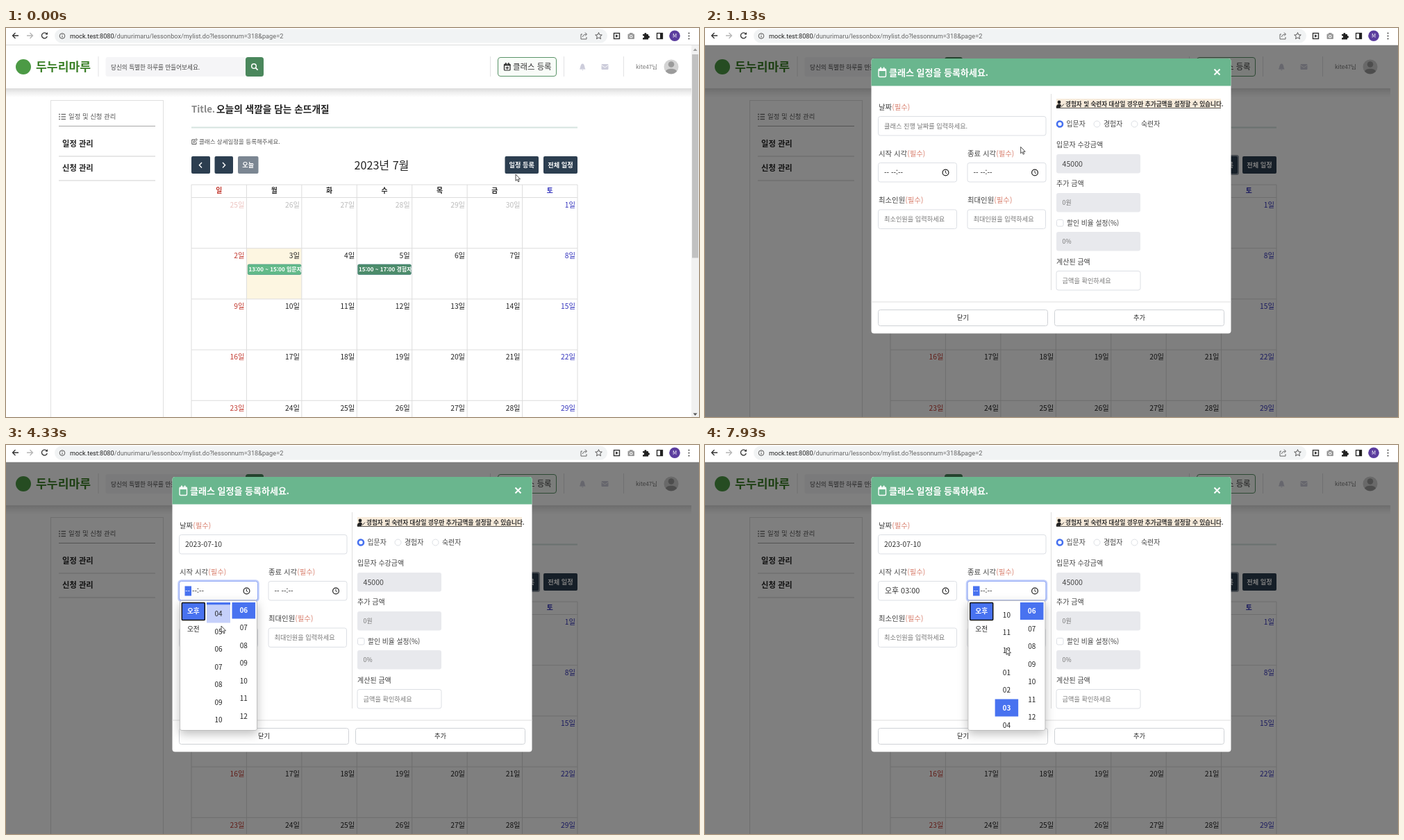
Recreate the animation shown at these times as an HTML page. Size 998x561 px, loop 8000 ms.

```html
<!DOCTYPE html>
<html lang="ko">
<head>
<meta charset="utf-8">
<title>일정 등록</title>
<style>
html, body { margin: 0; width: 100%; height: 100%; overflow: hidden; background: #fff; }
#stage { display: block; width: 100%; height: 100%; font-family: "Noto Sans CJK KR", "Noto Sans CJK JP", "Noto Sans", sans-serif; }
text { white-space: pre; }
.url { font-family: Roboto, "Open Sans", sans-serif; }
.float { filter: drop-shadow(0 5px 7px rgba(0, 0, 0, .25)); }
</style>
</head>
<body>
<svg id="stage" viewBox="0 0 998 561"></svg>
<script>
const LOOP = 8000, STEP = 200 / 3, PITCH = 25.5;
const BLUE = '#4872f0', INK = '#222', RED = '#c2392f', SAT = '#3434bd';
const BOLD = 'font-weight="700"', MID = 'text-anchor="middle"', END = 'text-anchor="end"';
const URL_HOST = 'mock.test:8080', URL_PATH = '/dunurimaru/lessonbox/mylist.do?lessonnum=318&amp;page=2';

// Text is placed by its vertical centre.
const T = (x, y, s, size, fill = INK, more = '') =>
  `<text x="${x}" y="${y + size * .37}" font-size="${size}" fill="${fill}" ${more}>${s}</text>`;
const R = (x, y, w, h, fill, more = '') =>
  `<rect x="${x}" y="${y}" width="${w}" height="${h}" fill="${fill}" ${more}/>`;
const P = (d, stroke, w = 1, fill = 'none', more = '') =>
  `<path d="${d}" stroke="${stroke}" stroke-width="${w}" fill="${fill}" ${more}/>`;
const C = (x, y, r, fill, more = '') => `<circle cx="${x}" cy="${y}" r="${r}" fill="${fill}" ${more}/>`;
const G = (id, body, more = '') => `<g id="${id}" ${more}>${body}</g>`;
const range = (a, b) => Array.from({ length: b - a + 1 }, (_, i) => a + i);
const dayColor = c => c === 0 ? RED : c === 6 ? SAT : INK;
const WEEK = [...'일월화수목금토'];

function browserBar() {
  return R(0, 0, 998, 25, '#fff') + P('M0 24.5H998', '#dcdcdc') +
    R(70, 1.5, 796, 20, '#f1f3f4', 'rx="10"') +
    P('M18 11H10M13.5 7 9.5 11 13.5 15', '#333', 1.3) +
    P('M30 11H38M34.5 7 38.5 11 34.5 15', '#b5b5b5', 1.3) +
    P('M58.6 8.4A4 4 0 1 0 59.3 12', '#333', 1.3) + P('M56.4 9.6H60V6Z', 'none', 0, '#333') +
    C(81, 11.5, 3.8, 'none', 'stroke="#555"') + P('M81 11V13.6M81 9V10', '#555') +
    `<text class="url" x="92" y="15" font-size="9.2" fill="${INK}">${URL_HOST}<tspan fill="#666">${URL_PATH}</tspan></text>` +
    P('M830 9H828V16H836V13M830.5 13Q831 9 836 9M834 6.5 836.5 9 834 11.5', '#666') +
    P('M853.5 6.5 854.9 9.8 858.3 10 855.7 12.3 856.5 15.7 853.5 13.9 850.5 15.7 851.3 12.3 848.7 10 852.1 9.8Z', '#555') +
    R(875.5, 7.5, 8, 8, 'none', 'stroke="#333" stroke-width="1.4"') + P('M878 9.2V13.8L881.8 11.5Z', 'none', 0, '#333') +
    R(895.5, 8.5, 9.5, 7.5, '#999', 'rx="1"') + R(898, 7, 4.5, 2, '#999') + C(900.2, 12.2, 2.2, '#fff') + C(900.2, 12.2, 1.2, '#999') +
    P('M917 9H919.3A1.6 1.6 0 1 1 922.4 9H925V11.3A1.6 1.6 0 1 1 925 14.4V16.5H917V14A1.5 1.5 0 1 0 917 11.2Z', 'none', 0, '#222') +
    R(937.5, 7.5, 8, 8, 'none', 'stroke="#222" stroke-width="1.3"') + R(942, 7.5, 4, 8, '#222') +
    C(963, 11.3, 7.8, '#5b3d9e') + T(963, 11.3, 'M', 7.5, '#fff', MID) +
    [7.5, 11.5, 15.5].map(y => C(983.5, y, 1, '#444')).join('');
}

function siteHeader() {
  const dividers = [133, 697.5, 803.5, 889.5].map(x => P(`M${x} 41V70`, '#e2e2e4')).join('');
  return R(0, 87, 987, 13, 'url(#shade)') + R(0, 25, 987, 62, '#fff') + dividers +
    C(25, 56, 11, '#4c9a45') + T(43, 55.5, '두누리마루', 17.2, '#3a7f27', 'font-weight="900"') +
    R(143.5, 42, 202, 28, '#f5f5f7', 'rx="3"') + T(151, 56.5, '당신의 특별한 하루를 만들어보세요.', 8.6, '#444') +
    R(345, 42, 26, 28, '#4a875c', 'rx="3.5"') + C(357, 55, 3.3, 'none', 'stroke="#fff" stroke-width="1.5"') + P('M359.6 57.6 362.6 60.6', '#fff', 1.6) +
    R(708.5, 42.5, 84, 27, '#f8fcf8', 'rx="3.5" stroke="#5a9468"') +
    R(717.5, 52, 8.5, 9, 'none', 'rx="1" stroke="#222" stroke-width="1.2"') + P('M717 53.5H726.5M719.8 50V53M723.8 50V53', '#222', 1.3) + P('M719.5 57.5H724M721.8 55.3V59.8', '#222') +
    T(730, 56, '클래스 등록', 11.4, '#333') +
    P('M826 59.5C827.5 57.5 827 52 830.3 51.6 833.6 52 833 57.5 834.6 59.5ZM829 60.2H831.7L830.3 61.6Z', 'none', 0, '#cdcddb') +
    R(857.5, 52, 10, 8, '#cdcddb', 'rx="1"') + P('M857.5 53.5 862.5 57 867.5 53.5', '#fff', .9) +
    T(907, 56, 'kite47님', 8.2, '#777') +
    C(958, 56, 10.5, '#d3d3d3') + C(958, 52.5, 4.3, '#9b9b9b') + P('M950 62.6C951 57.5 965 57.5 966 62.6 962 67.5 954 67.5 950 62.6Z', 'none', 0, '#9b9b9b');
}

function sidebar() {
  return R(64.5, 104.5, 162, 470, '#fff', 'stroke="#e0e0e0"') +
    [124.5, 128, 131.5].map(y => C(77, y, .9, '#666') + P(`M79.5 ${y}H86`, '#666', 1.3)).join('') +
    T(90, 128, '일정 및 신청 관리', 9.4, '#555') + P('M76 141.5H215', '#a8a8a8') +
    T(81, 167, '일정 관리', 11.3, INK, BOLD) + P('M76 185H215', '#cfcfcf') +
    T(81, 202, '신청 관리', 11.3, INK, BOLD) + P('M76 220H215', '#cfcfcf');
}

function calendar() {
  const w = 556 / 7, x0 = 267, y0 = 244.5, h = 73.2;
  const dark = (x, w, s) => R(x, 185, w, 25, '#2c3e50', 'rx="2"') + T(x + w / 2, 197.5, s, 9.2, '#fff', BOLD + MID.padStart(21));
  const cells = range(0, 34).map(i => {
    const col = i % 7, row = Math.floor(i / 7), other = i < 6;
    const n = other ? 25 + i : i - 5;
    return T((x0 + (col + 1) * w - 3).toFixed(1), y0 + row * h + 10.5, n + '일', 10.3, dayColor(col), END + (other ? ' opacity=".3"' : ''));
  }).join('');
  const lines = range(0, 7).map(i => P(`M${x0 + i * w} 226V561`, '#ddd')).join('') +
    [226, ...range(0, 4).map(i => y0 + i * h)].map(y => P(`M267 ${y}H823`, '#ddd')).join('');
  const event = (x, fill, edge, s) => R(x, 341, 76.5, 14.5, fill, `rx="1.5" stroke="${edge}" stroke-width=".8"`) + T(x + 1.2, 348.3, s, 8, '#fff', BOLD);
  return T(267, 117, 'Title.', 13.3, '#888', BOLD) + T(303, 117, '오늘의 색깔을 담는 손뜨개질', 13.7, INK, BOLD) +
    P('M267 143.5H823', '#d6e4df', 2) +
    P('M272 161H267.8V167.5H274V164.5M270 165.3 270.5 163.2 274 159.6 275.4 161 271.8 164.7Z', '#555') +
    T(278, 163.5, '클래스 상세일정을 등록해주세요.', 8.5, '#555') +
    R(267, 185, 27, 25, '#2c3e50', 'rx="2"') + P('M282 194 278.4 197.7 282 201.4', '#fff', 1.4) +
    R(300.5, 185, 26.5, 25, '#2c3e50', 'rx="2"') + P('M312 194 315.6 197.7 312 201.4', '#fff', 1.4) +
    R(334, 185, 29.5, 25, '#7b8692', 'rx="2"') + T(348.7, 197.5, '오늘', 9.2, '#fff', BOLD + ' ' + MID) +
    T(541, 198, '2023년 7월', 16.1, INK, MID) +
    G('ring', R(716.5, 183, 52.5, 29, '#8d97a2', 'rx="3.5"')) +
    R(718.5, 185, 48.5, 25, '#2c3e50', 'id="addBtn" rx="2"') + T(742.8, 197.5, '일정 등록', 9.2, '#fff', BOLD + ' ' + MID) +
    dark(774, 49, '전체 일정') +
    R(x0 + w, y0 + h, w, h, '#fdf6e1') + lines +
    WEEK.map((d, i) => T(x0 + (i + .5) * w, 234.5, d, 9.8, dayColor(i), BOLD + ' ' + MID)).join('') +
    cells +
    event(348.3, '#62ba89', '#4a9a86', '13:00 ~ 15:00 입문자') + event(506.8, '#4c8c6b', '#3f7c74', '15:00 ~ 17:00 경험자');
}

function scrollbar() {
  return R(987, 25, 11, 536, '#f1f1f1') + R(988, 38, 9, 293.5, '#c1c1c1') +
    P('M989.5 33 992.5 29.5 995.5 33Z', 'none', 0, '#9a9a9a') + P('M989.5 555.5 992.5 559 995.5 555.5Z', 'none', 0, '#555');
}

const box = (x, y, w, fill = '#fff', edge = '#dcdfe4') => R(x, y, w, 27.5, fill, `rx="3" stroke="${edge}"`);
const focusBox = (x, y, w) => R(x - 1, y - 1, w + 2, 29.5, 'none', 'rx="4" stroke="#c3d0fb" stroke-width="2.6"') + R(x, y, w, 27.5, 'none', 'rx="3" stroke="#93aaf6"');
const label = (x, y, s) => T(x, y, `${s}<tspan fill="#d9806f">(필수)</tspan>`, 10.4, '#444');

function timeField(id, x) {
  const c = x + 97;
  return box(x, 196.5, 113) + G(id + 'Focus', focusBox(x, 196.5, 113)) +
    G(id + 'Mark', R(x + 8, 203.5, 9.5, 14, BLUE)) +
    G(id + 'Blank', T(x + 8.5, 210.3, `<tspan id="${id}Dash">--</tspan> --:--`, 10.2, INK)) +
    G(id + 'Value', T(x + 9.5, 210.3, '오후 03:00', 10.9, '#333')) +
    C(c, 210.5, 4.4, 'none', 'stroke="#222" stroke-width="1.2"') + P(`M${c} 207.8V210.7L${c + 1.8} 212`, '#222');
}

function dialog() {
  const radio = (x, s, on) => C(x, 140.5, on ? 4 : 4.5, '#fff', on ? `stroke="${BLUE}" stroke-width="2.6"` : 'stroke="#dcdfe4"') + T(x + 9.5, 140, s, 9.9, '#444');
  const gray = (y, s, size, fill) => R(506, y, 121, 27.5, '#e8e9ed', 'rx="3"') + T(514.5, y + 14, s, size, fill);
  const button = (x, s) => R(x, 408.5, 244, 23, '#fff', 'rx="3" stroke="#cfd2d6"') + T(x + 122, 420, s, 9.2, INK, MID + ' font-weight="500"');
  return R(239.5, 46, 518, 396.5, '#fff', 'rx="4"') +
    P('M239.5 85.5V50Q239.5 46 243.5 46H753.5Q757.5 46 757.5 50V85.5Z', 'none', 0, '#6ab68e') +
    R(250, 61, 10.5, 11.5, 'none', 'rx="1.5" stroke="#fff" stroke-width="1.4"') + P('M250 63H260.5M253 58.5V62M257.6 58.5V62', '#fff', 1.8) +
    T(265, 66, '클래스 일정을 등록하세요.', 13, '#fff', BOLD) +
    P('M733.5 61.5 741.5 69.5M741.5 61.5 733.5 69.5', '#fff', 2) +
    P('M498.5 97V380', '#dedede') + P('M239.5 397H757.5', '#dedede') +
    label(250, 116, '날짜') + box(249.5, 129.5, 241.5) + G('dateFocus', focusBox(249.5, 129.5, 241.5) + P('M258.3 137.5V150', '#555', .8)) +
    G('dateHint', T(258, 143.5, '클래스 진행 날짜를 입력하세요.', 9.2, '#777')) + G('dateValue', T(258, 143.5, '2023-07-10', 10.3, '#333')) +
    label(250, 183.5, '시작 시각') + timeField('start', 249.5) +
    label(378, 183.5, '종료 시각') + timeField('end', 378) +
    label(250, 250.5, '최소인원') + box(249.5, 264, 113) + T(258, 277.8, '최소인원을 입력하세요', 9.2, '#777') +
    label(378, 250.5, '최대인원') + box(378, 264, 112.5) + T(386.5, 277.8, '최대인원을 입력하세요', 9.2, '#777') +
    R(506, 104, 237, 14, '#f7ebdb') + C(510, 109, 2.4, INK) + P('M506 116.5Q506.5 112 510 112 512 112 512.5 113L511.5 116.5ZM513 115.8 517 111.6', INK, .9, INK) +
    T(519, 111.5, '경험자 및 숙련자 대상일 경우만 추가금액을 설정할 수 있습니다.', 8.6, '#333', BOLD) + P('M506 117.5H743', '#444', .9) +
    radio(511, '입문자', true) + radio(564.5, '경험자') + radio(618.5, '숙련자') +
    T(506, 170.5, '입문자 수강금액', 10, '#444') + gray(184, '45000', 10.6, '#444') +
    T(506, 226.5, '추가 금액', 10, '#444') + gray(240, '0원', 8.8, '#777') +
    R(506.5, 278.5, 9.5, 9.5, '#fff', 'rx="2" stroke="#dcdfe4"') + T(521, 283, '할인 비율 설정(%)', 9.8, '#444') + gray(296, '0%', 8.8, '#777') +
    T(506, 339, '계산된 금액', 10, '#444') + box(506, 352.5, 121) + T(514.5, 366.5, '금액을 확인하세요', 9.2, '#777') +
    button(249.5, '닫기') + button(503.5, '추가');
}

function datePicker() {
  const rows = [240, 269, 298, 322, 345.5, 369];
  const days = range(1, 31).map(n => {
    const i = n + 5, col = i % 7, y = rows[Math.floor(i / 7)];
    const fill = n < 3 ? '#c4c4c4' : col === 0 ? RED : col === 6 ? '#4b6fdc' : INK;
    return T(275 + col * 24, y, n, 8, fill, `id="day${n}" ${MID} ${n < 3 ? '' : BOLD}`);
  }).join('');
  return R(250, 165, 194, 227.5, '#fff', 'class="float" rx="2"') +
    P('M274.5 188 271.8 191 274.5 194', '#999', 1.1) + P('M419.5 188 422.2 191 419.5 194', INK, 1.4) +
    T(347, 192, '2023년 7월', 9.6, INK, BOLD + ' ' + MID) +
    WEEK.map((d, i) => T(275 + i * 24, 216, d, 9.2, i === 0 ? RED : i === 6 ? '#4b6fdc' : '#444', MID)).join('') +
    '<ellipse cx="299" cy="269" rx="8.8" ry="13.8" fill="#ededed"/>' + days;
}

// A looping list of two-digit values; entries beyond its start sit past a gap.
const hours = { x: 289, from: -9, gapAt: -2, gap: 6.5, value: d => (d + 14) % 12 + 1 };
const minutes = { x: 325.3, from: -14, gapAt: -5, gap: 35, value: d => (d + 66) % 60 };
const itemTop = (c, d) => d * PITCH - (d < c.gapAt ? c.gap : 0);

function column(id, c) {
  const item = (d, fill, more = '') => T(17, itemTop(c, d) + 12.5, String(c.value(d)).padStart(2, '0'), 10, fill, MID + more);
  const picked = (name, d) => G(id + name, R(0, itemTop(c, d), 34, 25, BLUE) + item(d, '#fff', ' ' + BOLD));
  return `<svg x="${c.x}" y="227" width="34" height="183">` +
    G(id, R(0, 0, 34, 25.5, '#c5d0fa', `id="${id}Hover"`) + range(c.from, 8).map(d => item(d, INK)).join('') +
      picked('Now', 0) + (c === minutes ? picked('Zero', -6) : '')) + '</svg>';
}

function timePopup(id, dx) {
  return G(id + 'Popup', R(250.5, 224.5, 111, 187, '#fff', 'class="float" rx="2.5" stroke="#b4b4b4" stroke-width=".8"') +
    R(253, 227.3, 33.5, 25.2, BLUE) + R(253.3, 227.6, 33, 25, 'none', `id="${id}Edge" stroke="#111" stroke-width="1.5" rx="1"`) +
    T(269.8, 239.3, '오후', 9.7, '#fff', BOLD + ' ' + MID) + T(269.8, 265, '오전', 9.7, INK, MID) +
    column(id + 'H', hours) + column(id + 'M', minutes), `transform="translate(${dx} 0)"`);
}

function statusBubble() {
  return R(0, 548, 266, 13, '#fff', 'id="bubble"') +
    `<text class="url" id="bubbleText" x="2" y="558.5" font-size="8.2">${URL_HOST}${URL_PATH}#</text>`;
}

function pointer() {
  return G('arrow', P('M0 0V9.4L2.1 7.4 3.6 10.8 5.1 10.1 3.6 6.9H6.5Z', '#222', .8, '#fff')) +
    G('hand', P('M-1 1V7L-2.4 5.8-3.5 6.8-.5 11V12.6H4.6V11L5.2 7C5.2 5.6 3.8 5.6 3.7 6.2 3.4 5 2.2 5.2 2.2 5.8 2 4.8 1 5 1 5V1C1-.3-1-.3-1 1Z', '#111', .9, '#fff')) +
    G('beam', P('M-2-5H2M0-5V5M-2 5H2', '#222'));
}

document.getElementById('stage').innerHTML =
  '<defs><linearGradient id="shade" x2="0" y2="1"><stop stop-opacity=".14"/><stop offset=".5" stop-opacity=".06"/><stop offset="1" stop-opacity="0"/></linearGradient></defs>' +
  R(0, 0, 998, 561, '#fff') + sidebar() + calendar() + siteHeader() + G('scroll', scrollbar()) +
  R(0, 25, 998, 536, '#000', 'id="shadeAll"') +
  G('dialog', dialog()) + G('picker', datePicker()) + timePopup('start', 0) + timePopup('end', 128.4) +
  G('status', statusBubble()) + browserBar() + G('pointer', pointer());

const el = {};
document.querySelectorAll('[id]').forEach(n => el[n.id] = n);
const show = (id, on) => el[id].setAttribute('display', on ? 'inline' : 'none');
const set = (id, name, v) => el[id].setAttribute(name, v);
const within = (t, a, b) => t >= a && t < b;

// Rows are [time, value...].
const pointerKeys = [[133, 734, 211], [400, 742, 201], [800, 742, 201], [933, 585, 199], [1333, 325, 144],
  [1533, 325, 144], [1933, 317, 275], [2200, 300, 296], [2533, 300, 296], [2933, 344, 208], [3333, 344, 208],
  [4067, 310, 260], [4133, 310, 261], [4333, 310, 261], [4733, 350, 255], [5800, 350, 255], [6267, 350, 333],
  [6533, 350, 333], [6933, 474, 208], [7133, 474, 208], [7400, 434, 285], [7933, 434, 293]];
const shadeKeys = [[667, 0], [733, .1], [800, .215], [867, .4], [933, .49], [1000, .5]];
const fadeKeys = [[867, 0], [933, .33], [1000, .75], [1067, 1]];
const dropKeys = [[933, -27], [1000, -14], [1067, -6], [1133, -2], [1200, 0]];
const startHourKeys = [[4267, 0], [4333, -21.5]];
const startMinuteKeys = [[4867, -1.5], [5067, 50], [5267, 102], [5533, 160], [5733, 212], [5933, 264], [6067, 288]];
const endHourKeys = [[7400, 0], [7600, 52], [7733, 88], [7867, 126], [7933, 139.5]];

function at(keys, t, ease = u => u) {
  const i = keys.findIndex(k => k[0] > t);
  if (i === 0) return keys[0].slice(1);
  if (i < 0) return keys[keys.length - 1].slice(1);
  const a = keys[i - 1], b = keys[i], u = ease((t - a[0]) / (b[0] - a[0]));
  return a.slice(1).map((v, n) => v + (b[n + 1] - v) * u);
}
const smooth = u => u * u * (3 - 2 * u);

function hover(id, c, x, y, shift, allowed) {
  let rel = y - 227 - shift;
  const edge = c.gapAt * PITCH, inGap = rel < edge && rel > edge - c.gap;
  if (rel <= edge - c.gap) rel += c.gap;
  const d = Math.floor(rel / PITCH);
  show(id, allowed && !inGap && x >= c.x && x < c.x + 34 && y > 227);
  set(id, 'y', itemTop(c, d));
}

function draw(ms) {
  const t = Math.floor((ms + 4) / STEP) * STEP;
  const [x, y] = at(pointerKeys, t, smooth);
  const kind = within(t, 1190, 1590) ? 'beam' : within(t, 1860, 2590) ? 'hand' : 'arrow';
  set('pointer', 'transform', `translate(${x} ${y})`);
  ['arrow', 'hand', 'beam'].forEach(k => show(k, k === kind));

  set('addBtn', 'fill', within(t, 260, 930) ? '#1e2b37' : '#2c3e50');
  show('ring', t > 590);
  show('scroll', t < 660);
  set('shadeAll', 'opacity', at(shadeKeys, t)[0]);
  set('dialog', 'opacity', at(fadeKeys, t)[0]);
  set('dialog', 'transform', `translate(0 ${at(dropKeys, t)[0]})`);

  const dated = t > 2590;
  show('dateFocus', within(t, 1530, 2590));
  show('dateHint', !dated);
  show('dateValue', dated);
  show('picker', within(t, 1590, 2590));
  set('day4', 'fill', within(t, 1860, 2060) ? '#888' : INK);
  set('day10', 'fill', t > 2060 ? '#888' : INK);

  show('status', within(t, 1860, 2790));
  const faint = within(t, 1860, 1990) || t > 2660;
  set('bubble', 'opacity', faint ? .12 : 1);
  set('bubbleText', 'fill', faint ? '#c6c6c6' : '#5f6368');

  const startOpen = within(t, 3330, 6590), endOpen = t > 6990, chosen = t > 6530;
  show('startFocus', startOpen);
  show('startMark', startOpen && !chosen);
  set('startDash', 'fill', startOpen ? '#fff' : INK);
  show('startBlank', !chosen);
  show('startValue', chosen);
  show('endFocus', endOpen);
  show('endMark', endOpen);
  set('endDash', 'fill', endOpen ? '#fff' : INK);
  show('endValue', false);

  show('startPopup', startOpen);
  show('startEdge', t < 6330);
  show('startMNow', !chosen);
  show('startMZero', chosen);
  show('endPopup', endOpen);
  show('endMZero', false);
  const shift = (id, v) => set(id, 'transform', `translate(0 ${v})`);
  shift('startH', at(startHourKeys, t)[0]);
  shift('startM', at(startMinuteKeys, t)[0]);
  shift('endH', at(endHourKeys, t)[0]);
  // The highlight trails the scroll by one step.
  hover('startHHover', hours, x, y, at(startHourKeys, t - STEP)[0], startOpen);
  hover('startMHover', minutes, x, y, at(startMinuteKeys, t - STEP)[0], startOpen);
  show('endHHover', false);
  show('endMHover', false);
}

const begin = performance.now();
function tick() {
  draw((performance.now() - begin) % LOOP);
  requestAnimationFrame(tick);
}
tick();
</script>
</body>
</html>
```
